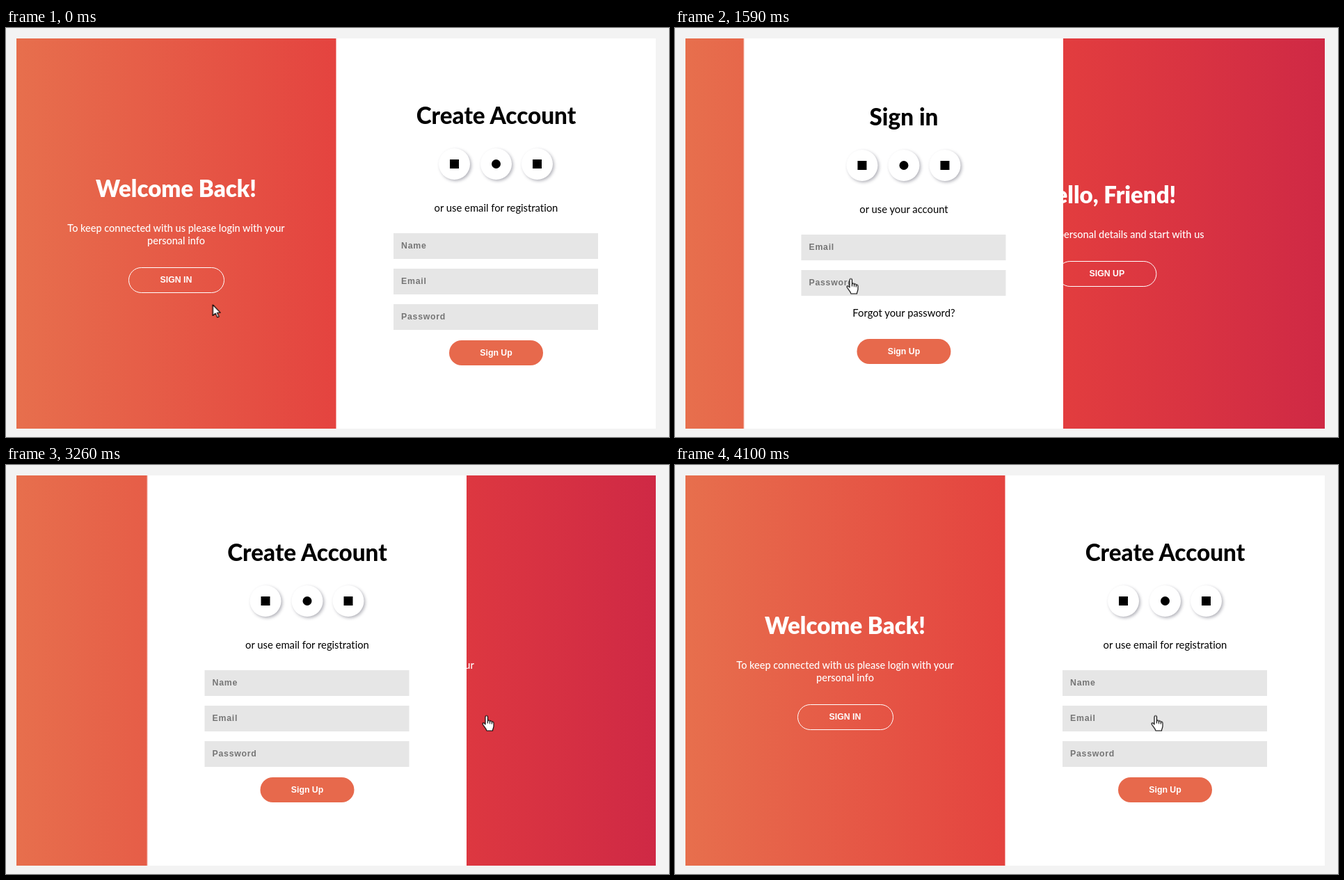
These frames come from a looping animation (953 by 588 pixels, 4230 ms). An HTML page:

```html
<!DOCTYPE html>
<html lang="en">
<head>
<meta charset="utf-8">
<title>Sliding sign-in form</title>
<style>
html, body { margin: 0; width: 100%; height: 100%; overflow: hidden; background: #f3f3f3; }
body { position: relative; font: 14.8px/18px Lato, sans-serif; font-variant-ligatures: none; color: #000; }
body *, .dots i { position: absolute; box-sizing: border-box; }
br { position: static; }

.card {
  left: 15px; top: 15px; width: 919px; height: 561px; overflow: hidden;
  background: linear-gradient(to right, #e76f4d, #e43f3e 55%, #cf2945);
}
.panel {
  top: 0; width: 459px; height: 561px;
  animation: slide 4230ms linear infinite;
}
.side { left: 0; color: #fff; --to: 460px; }
.form { left: 460px; background: #fff; box-shadow: -1px 0 rgba(255, 255, 255, .5); --to: -459px; }

/* Each view uses page heights; --shift nudges the shorter ones down. */
.view { left: 0; top: calc(var(--shift, 0px) - 15px); width: 100%; height: 100%; }
.join { animation: join 4230ms step-end infinite; }
.login { animation: login 4230ms step-end infinite; }

h1, p { left: 0; width: 100%; margin: 0; text-align: center; white-space: nowrap; }
h1 { top: calc(var(--y) * 1px - 20px); font-size: 33.3px; line-height: 40px; font-weight: 800; }
p { top: calc(var(--y) * 1px - 9px); }
.side h1 { font-size: 33px; font-weight: 900; }
.side p { font-size: 14.5px; font-weight: 500; }

.field, .button { top: calc(var(--y) * 1px); font: bold 12.3px/37px "Liberation Sans", Arial, sans-serif; }
.field {
  left: 82px; width: 294px; height: 37px; padding-left: 11px;
  background: #e6e6e6; color: #757575; letter-spacing: .75px;
}
.button {
  left: calc(50% - var(--w) / 2); width: var(--w); height: 36px; line-height: 36px;
  border-radius: 19px; text-align: center; color: #fff;
}
.solid { --w: 135px; background: #e7694c; }
.ghost { height: 37px; line-height: 35px; border: 1px solid #fff; }

.dots b {
  top: 173px; left: calc(var(--x) * 1px - 22.5px); width: 45px; height: 45px;
  border-radius: 50%; background: #fff; box-shadow: 2px 2px 4px rgba(50, 50, 70, .36);
}
.dots i { left: 16px; top: 16px; width: 13px; height: 13px; background: #000; }
.dots b:nth-child(2) i { border-radius: 50%; }

.cursor { left: 0; top: 0; width: 1px; height: 1px; overflow: visible; animation: point 4230ms linear infinite; }
.cursor path { fill: #fff; stroke: #000; stroke-width: 1.1; stroke-linejoin: round; }
.arrow { animation: arrow 4230ms step-end infinite; }
.hand { animation: hand 4230ms step-end infinite; }

@keyframes slide {
  0%, 25.449% { transform: none; animation-timing-function: ease; }
  48.96%, 70.875% { transform: translateX(var(--to)); animation-timing-function: ease; }
  95.65%, 100% { transform: none; }
}
@keyframes join {
  0%, 70.875%, 100% { visibility: visible; }
  25.449% { visibility: hidden; }
}
@keyframes login {
  0%, 70.875%, 100% { visibility: hidden; }
  25.449% { visibility: visible; }
}
@keyframes point {
  0% { transform: translate(297.5px, 398px); }
  4.965% { transform: translate(280px, 416px); }
  8.274% { transform: translate(257px, 404px); }
  11.82% { transform: translate(246px, 374px); }
  13.239% { transform: translate(246px, 367px); animation-timing-function: ease-out; }
  21.277%, 46.099% { transform: translate(253px, 360.5px); animation-timing-function: ease-in; }
  51.064% { transform: translate(427.5px, 361.5px); }
  52.719% { transform: translate(544.5px, 363px); animation-timing-function: ease-out; }
  63.83%, 100% { transform: translate(691px, 360.5px); }
}
@keyframes arrow {
  0%, 46.099% { visibility: visible; }
  10.402%, 56.501%, 100% { visibility: hidden; }
}
@keyframes hand {
  0%, 46.099% { visibility: hidden; }
  10.402%, 56.501%, 100% { visibility: visible; }
}
</style>
</head>
<body>
<div class="card">
  <div class="panel side">
    <div class="view join">
      <h1 style="--y:230">Welcome Back!</h1>
      <p style="--y:288">To keep connected with us please login with your<br>personal info</p>
      <div class="button ghost" style="--y:344;--w:138px">SIGN IN</div>
    </div>
    <div class="view login" style="--shift:9px">
      <h1 style="--y:230">Hello, Friend!</h1>
      <p style="--y:288">Enter your personal details and start with us</p>
      <div class="button ghost" style="--y:326;--w:143px">SIGN UP</div>
    </div>
  </div>
  <div class="panel form">
    <div class="view join">
      <h1 style="--y:125">Create Account</h1>
      <div class="dots"><b style="--x:169.5"><i></i></b><b style="--x:229"><i></i></b><b style="--x:288.5"><i></i></b></div>
      <p style="--y:257.5">or use email for registration</p>
      <div class="field" style="--y:295">Name</div>
      <div class="field" style="--y:346">Email</div>
      <div class="field" style="--y:397">Password</div>
      <div class="button solid" style="--y:449">Sign Up</div>
    </div>
    <div class="view login" style="--shift:2px">
      <h1 style="--y:125">Sign in</h1>
      <div class="dots"><b style="--x:169.5"><i></i></b><b style="--x:229"><i></i></b><b style="--x:288.5"><i></i></b></div>
      <p style="--y:257.5">or use your account</p>
      <div class="field" style="--y:295">Email</div>
      <div class="field" style="--y:346">Password</div>
      <p style="--y:407">Forgot your password?</p>
      <div class="button solid" style="--y:445">Sign Up</div>
    </div>
  </div>
</div>
<svg class="cursor">
  <path class="arrow" d="M0 0V15.5L3.6 12.2 6.3 18 8.6 17 6 11.3H10.7Z"/>
  <path class="hand" d="M-2 1.5C-2-.5 1.5-.5 1.5 1.5V7.5C2 6.2 4.5 6.5 4.5 8 5 7 7.3 7.3 7.3 9 8 8.2 10 8.6 10 10.5V15C10 17.5 8.5 18.5 8.5 21.5H0C-.5 18.5-4 15.5-5.8 12.3-6.5 10.5-4.5 9.8-3.3 11L-2 12.5ZM1.5 7V11M4.5 8V11.5M7.3 9V12"/>
</svg>
<script>
// Hold the CSS motion on a 70 ms cadence that restarts at each mark.
const loop = 4230, step = 70, lead = 8;
const marks = [2910, 1670, 1100, 0];
const motions = document.getAnimations();
motions.forEach(m => m.pause());

function draw() {
  const t = (performance.now() + lead) % loop;
  const from = marks.find(m => m <= t);
  const held = from + Math.floor((t - from) / step) * step;
  motions.forEach(m => { m.currentTime = held; });
  requestAnimationFrame(draw);
}
draw();
</script>
</body>
</html>
```
